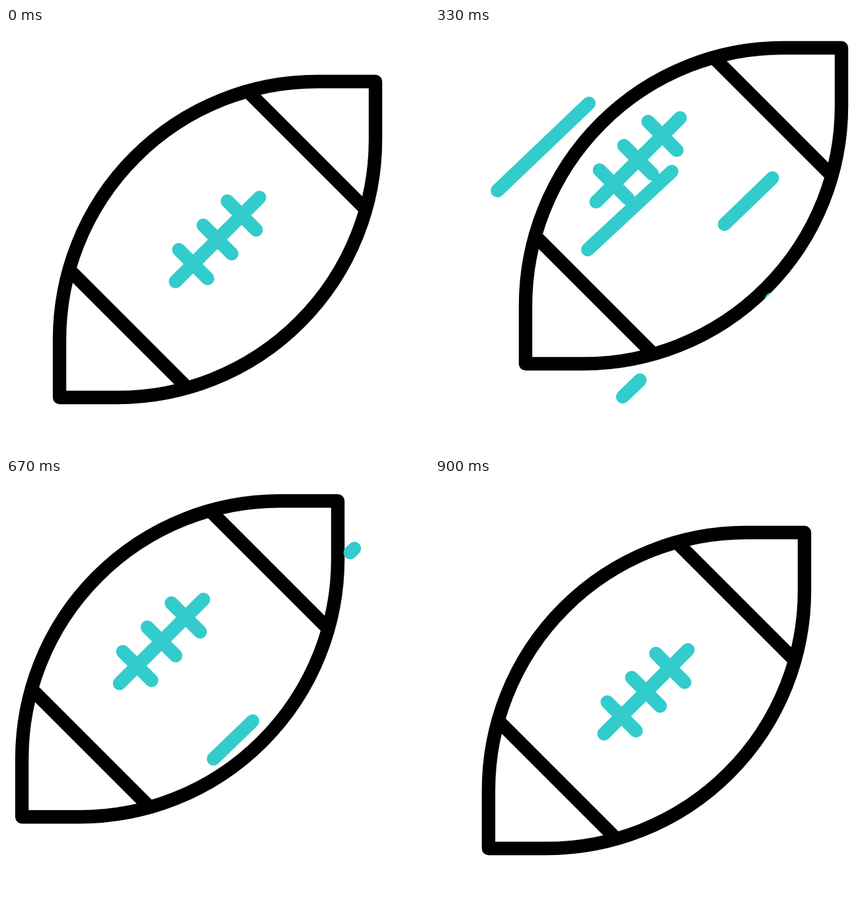
Recreate the animation shown at these times as an HTML page with a canvas. Size 640 px wide and 640 px high, loop 1670 ms.

```html
<!DOCTYPE html>
<html lang="en">
<head>
<meta charset="utf-8">
<title>Spinning football</title>
<style>
html, body { margin: 0; width: 100%; height: 100%; overflow: hidden; background: #fff; }
canvas { display: block; width: 100vmin; height: 100vmin; }
</style>
</head>
<body>
<canvas width="640" height="640"></canvas>
<script>
const ctx = document.querySelector('canvas').getContext('2d');
const LOOP = 1670, STEP = 100 / 3, LAST = 27;
const BLACK = '#000', TEAL = '#33cccc';

const ball = new Path2D(
  'M559 81H471A390 390 0 0 0 81 471V559H169A390 390 0 0 0 559 169Z' +
  'M366 96L544 274M96 366L274 544');
const rim = new Path2D(
  'M569.2 70.8H471A400.2 400.2 0 0 0 70.8 471V569.2H169A400.2 400.2 0 0 0 569.2 169Z');
const lace = new Path2D(
  'M256.5 383.5L383.5 256.5M335 262L378.5 305.5M298.5 298.5L341.5 341.5M261.5 335.5L305 379');

// Keys are [step, value] pairs
const ballX = [[0, 0], [5, 33], [9, 57.5], [10, 56], [14, -3], [16, -48], [17, -60], [18, -65], [22, -42], [27, 0]];
const ballY = [[0, 0], [5, -23], [9, -45], [10, -51], [14, -63], [16, -65], [17, -63], [18, -60], [22, -33], [27, 0]];
const spin = [[0, 0], [5, 44.5], [10, 163], [14, 280.5], [17, 358], [22, 435], [24, 441], [27, 442]];

// Speed lines: first step, then start and end point relative to the ball
const streaks = [
  [0, 155, 405, 311, 260],
  [3, 38.5, 297, 254.5, 91],
  [5, 382, 348, 584, 153],
  [7, 228, 609, 430, 414]
];

// Monotone cubic interpolation, at rest at both ends
function curve(keys, n) {
  const slope = i => (keys[i + 1][1] - keys[i][1]) / (keys[i + 1][0] - keys[i][0]);
  const tangent = i => {
    if (i === 0 || i === keys.length - 1) return 0;
    const a = slope(i - 1), b = slope(i);
    return a * b > 0 ? 2 * a * b / (a + b) : 0;
  };
  let i = 0;
  while (i < keys.length - 2 && n >= keys[i + 1][0]) i++;
  const [x0, y0] = keys[i], [x1, y1] = keys[i + 1];
  const w = x1 - x0, u = (n - x0) / w, v = 1 - u;
  return y0 * v * v * (1 + 2 * u) + y1 * u * u * (1 + 2 * v)
    + w * u * v * (v * tangent(i) - u * tangent(i + 1));
}

// cubic-bezier(.42, 0, .58, 1)
function ease(t) {
  if (t <= 0) return 0;
  if (t >= 1) return 1;
  let lo = 0, hi = 1;
  for (let i = 0; i < 24; i++) {
    const u = (lo + hi) / 2, v = 1 - u;
    if (1.26 * u * v * v + 1.74 * u * u * v + u * u * u < t) lo = u; else hi = u;
  }
  return lo * lo * (3 - 2 * lo);
}

function drawLace(shift, skew) {
  ctx.save();
  ctx.translate(shift * 0.949 + skew, shift);
  ctx.stroke(lace);
  ctx.restore();
}

function drawStreak([start, x0, y0, x1, y1], n) {
  const head = ease((n - start) / 12), tail = ease((n - start - 8) / 8);
  if (head <= tail) return;
  ctx.beginPath();
  for (const k of [tail, head]) ctx.lineTo(x0 + (x1 - x0) * k, y0 + (y1 - y0) * k);
  ctx.stroke();
}

function draw(n) {
  ctx.fillStyle = '#fff';
  ctx.fillRect(0, 0, 640, 640);
  ctx.lineWidth = 20.4;
  ctx.lineCap = ctx.lineJoin = 'round';
  ctx.save();
  ctx.translate(curve(ballX, n), curve(ballY, n));
  ctx.strokeStyle = BLACK;
  ctx.stroke(ball);

  ctx.strokeStyle = TEAL;
  ctx.save();
  ctx.clip(rim);
  const roll = curve(spin, n);
  drawLace(roll, 0);
  drawLace(roll - 232.5, -2.7);
  drawLace(roll - 440, -2.7);
  ctx.restore();

  for (const s of streaks) drawStreak(s, n);
  ctx.restore();
}

function tick() {
  const t = Math.floor(performance.now() % LOOP / 10) * 10;
  draw(Math.min(LAST, Math.floor((t + 3.4) / STEP)));
  requestAnimationFrame(tick);
}
tick();
</script>
</body>
</html>
```
